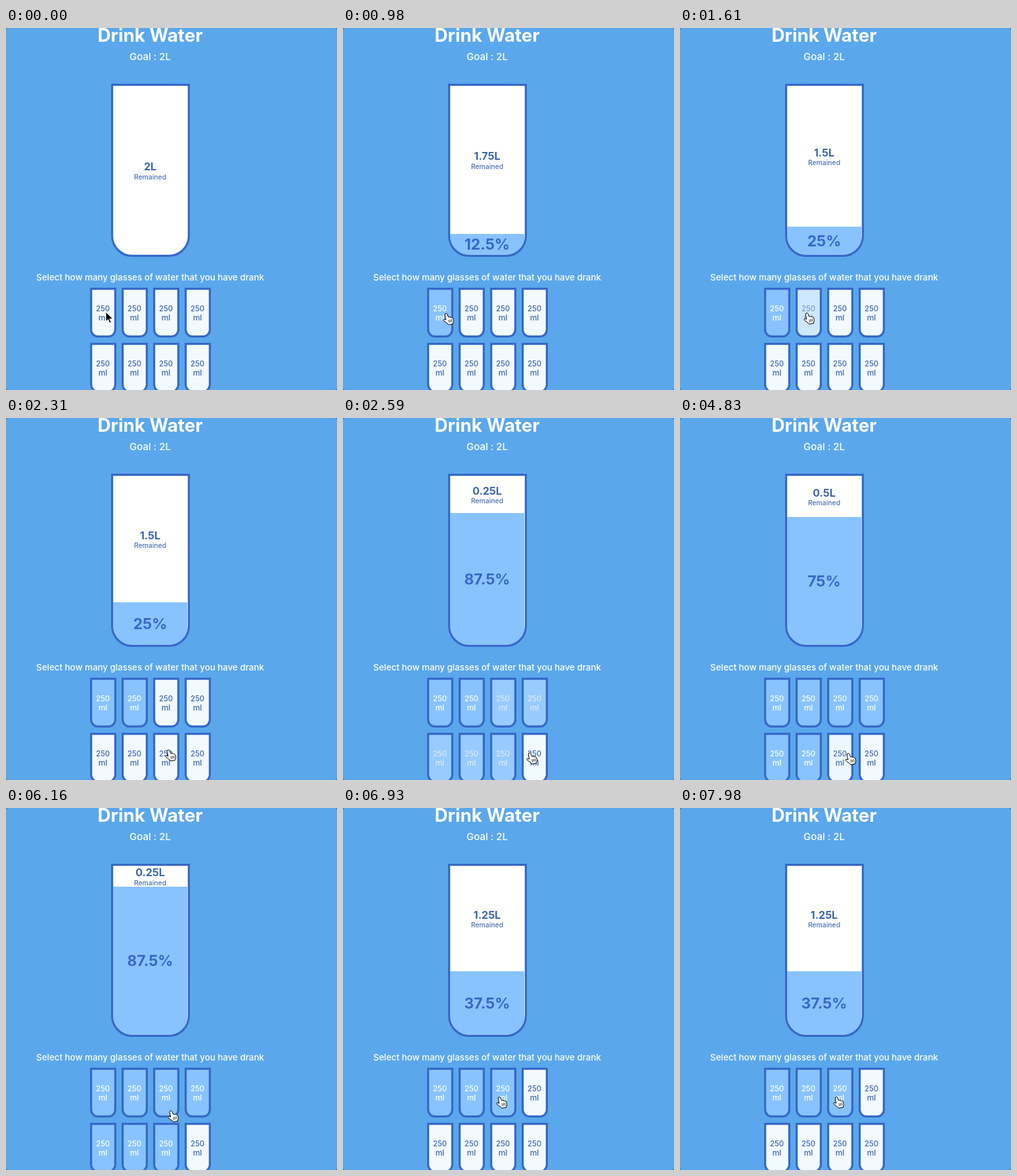
An HTML page for the animation above (8 s loop, 504x552 px).

```html
<!DOCTYPE html>
<html lang="en">
<head>
<meta charset="utf-8">
<title>Drink Water</title>
<style>
  html, body { margin: 0; width: 100%; height: 100%; overflow: hidden; background: #3f6f9f; }
  svg { display: block; width: 504px; height: 552px; background: #5aa7ec; border-radius: 4px; }
  text { font-family: Inter, "Open Sans", sans-serif; font-weight: 500; text-anchor: middle; }
  .light { fill: #fff; }
  .bold { font-weight: 700; }
  .cup { stroke: #3668c8; stroke-width: 3.2; }
  .cursor { stroke: #000; stroke-width: 1; stroke-linejoin: round; stroke-linecap: round; }
</style>
</head>
<body>
<svg id="stage" viewBox="0 0 504 552"></svg>
<script>
const LOOP = 8000, STEP = 70, TRANSITION = 300;
const GLASSES = 8, GOAL = 2, BORDER = 3.2;
const INNER = { x: 163, top: 88.2, bottom: 345.8, width: 113 };
const EMPTY = [243, 250, 255], FULL = [136, 195, 255];
const INK = [60, 102, 180], WHITE = [255, 255, 255];

// [time, number of full glasses after the click]
const clicks = [[700, 1], [1545, 2], [2425, 7], [3000, 8], [3724, 7], [4620, 6], [5400, 7], [6650, 3]];

// [time, x, y] of the pointer tip
const pointer = [
  [0, 152, 433], [280, 149, 435], [850, 149, 435], [1330, 193, 434], [1750, 193, 434],
  [2380, 249, 508], [2590, 284, 510], [2850, 292, 515], [3780, 294, 516], [4000, 294, 516],
  [4480, 256, 511], [5820, 257, 511], [6160, 251, 461], [6480, 239, 442], [7000, 238, 440], [LOOP, 238, 440]
];

const stage = document.getElementById('stage');

function add(tag, attrs, parent = stage) {
  const el = document.createElementNS('http://www.w3.org/2000/svg', tag);
  for (const key in attrs) el.setAttribute(key, attrs[key]);
  parent.append(el);
  return el;
}

function label(text, x, y, size, attrs, parent) {
  const el = add('text', { x, y, 'font-size': size, ...attrs }, parent);
  el.textContent = text;
  return el;
}

// Outer box and corner radius, inset by the given distance
function cupPath(x, y, w, h, radius, inset) {
  const r = radius - inset, width = w - 2 * inset, height = h - 2 * inset;
  return `M${x + inset} ${y + inset}h${width}v${height - r}a${r} ${r} 0 0 1 ${-r} ${r}` +
    `h${2 * r - width}a${r} ${r} 0 0 1 ${-r} ${-r}z`;
}

const mix = (a, b, p) => `rgb(${a.map((v, i) => Math.round(v + (b[i] - v) * p))})`;

// CSS "ease": cubic-bezier(.25, .1, .25, 1)
function ease(x) {
  if (x <= 0) return 0;
  if (x >= 1) return 1;
  const curve = (u, a, b) => 3 * a * u * (1 - u) ** 2 + 3 * b * u * u * (1 - u) + u ** 3;
  let low = 0, high = 1;
  for (let i = 0; i < 24; i++) {
    const mid = (low + high) / 2;
    if (curve(mid, .25, .25) < x) low = mid; else high = mid;
  }
  return curve(low, .1, 1);
}

label('Drink Water', 219.5, 21.3, 27.8, { class: 'light bold' });
label('Goal : 2L', 219.5, 49, 15, { class: 'light' });
label('Select how many glasses of water that you have drank', 219.5, 385, 13.35, { class: 'light' });

// Big cup
const bigCup = inset => cupPath(160, 85, 120, 264, 32, inset);
const clip = add('clipPath', { id: 'inside' });
add('path', { d: bigCup(BORDER) }, clip);
add('path', { d: bigCup(BORDER / 2), fill: '#fff' });
const inside = add('g', { 'clip-path': 'url(#inside)' });
const liters = label('', 219.5, 0, 16, { class: 'bold', fill: '#3c65ae' }, inside);
const remained = label('Remained', 219.5, 0, 10.4, { fill: '#4a70b4' }, inside);
const water = add('rect', { x: INNER.x, width: INNER.width, fill: '#88c3ff' }, inside);
const percent = label('', 219.5, 0, 22.8, { class: 'bold', fill: '#3668c8' }, inside);
add('path', { d: bigCup(BORDER / 2), fill: 'none', class: 'cup' });

// Small glasses
const glasses = Array.from({ length: GLASSES }, (_, i) => {
  const x = 128 + 48 * (i % 4), y = 396 + 84 * Math.floor(i / 4);
  const body = add('path', { d: cupPath(x, y, 40, 76, 12, BORDER / 2), class: 'cup' });
  const texts = add('g', {});
  label('250', x + 19.5, y + 35.6, 11.3, {}, texts);
  label('ml', x + 19.5, y + 49.6, 12, {}, texts);
  return { x, y, body, texts };
});

// Pointers, both with the tip at the origin
const arrow = add('path', {
  class: 'cursor', fill: '#000', style: 'stroke:#fff',
  d: 'M0 0V14.5L3.4 11.4L5.8 17L8.2 16L5.8 10.6H10.4z'
});
const hand = add('g', { class: 'cursor', fill: '#fff' });
add('path', {
  d: 'M-1.2 1.2Q.4-.6 1.6 1.2L3.6 6Q5 5 6 6.3Q7.4 5.5 8.3 6.8Q10 6.3 10.6 8L11.4 11.6' +
     'Q11.6 13.6 10.4 15L10.6 16.4L3.4 17.6L2.6 16.2Q-.4 14-3.6 11.6Q-5 9.8-3.2 9.2L-.2 10.2L-1.8 3Q-2 2-1.2 1.2z'
}, hand);
add('path', { d: 'M4 10.6L4.6 14M6.2 10.2L6.8 13.6M8.4 9.8L9 13.2', fill: 'none', 'stroke-width': .8 }, hand);

function pointerAt(t) {
  const next = Math.max(1, pointer.findIndex(k => k[0] > t));
  const [t0, x0, y0] = pointer[next - 1], [t1, x1, y1] = pointer[next];
  const u = (t - t0) / (t1 - t0), p = u * u * (3 - 2 * u);
  return [x0 + (x1 - x0) * p, y0 + (y1 - y0) * p];
}

function drawBigCup(from, to, p) {
  const level = (from + (to - from) * p) / GLASSES;
  const height = (INNER.bottom - INNER.top) * level;
  const top = Math.round(INNER.bottom - height);
  const middle = (INNER.top + top) / 2;
  water.setAttribute('y', top);
  water.setAttribute('height', INNER.bottom - top);
  liters.textContent = to < GLASSES ? `${GOAL - GOAL * to / GLASSES}L` : '';
  liters.setAttribute('y', middle);
  remained.setAttribute('y', middle + 13.5);
  remained.setAttribute('visibility', to < GLASSES ? 'visible' : 'hidden');
  percent.textContent = to ? `${to / GLASSES * 100}%` : '';
  percent.setAttribute('y', (top + INNER.bottom) / 2 + 8.2);
}

function drawGlasses(from, to, p) {
  glasses.forEach(({ body, texts }, i) => {
    const was = +(i < from), is = +(i < to);
    const fullness = was + (is - was) * p;
    body.setAttribute('fill', mix(EMPTY, FULL, fullness));
    texts.setAttribute('fill', mix(INK, WHITE, fullness));
  });
}

function drawPointer(t) {
  const [x, y] = pointerAt(t);
  const over = t >= STEP && glasses.some(g => x >= g.x && x <= g.x + 40 && y >= g.y && y <= g.y + 76);
  for (const [el, shown] of [[arrow, !over], [hand, over]]) {
    el.setAttribute('transform', `translate(${x} ${y})`);
    el.setAttribute('visibility', shown ? 'visible' : 'hidden');
  }
}

function render(t) {
  const done = clicks.filter(c => c[0] <= t);
  const [since, to] = done.at(-1) || [-TRANSITION, 0];
  const from = done.length > 1 ? done.at(-2)[1] : 0;
  const p = ease((t - since) / TRANSITION);
  drawBigCup(from, to, p);
  drawGlasses(from, to, p);
  drawPointer(t);
}

const start = performance.now();
function tick(now) {
  const t = Math.max(0, now - start) % LOOP;
  render(Math.floor(t / STEP) * STEP);
  requestAnimationFrame(tick);
}
render(0);
requestAnimationFrame(tick);
</script>
</body>
</html>
```
